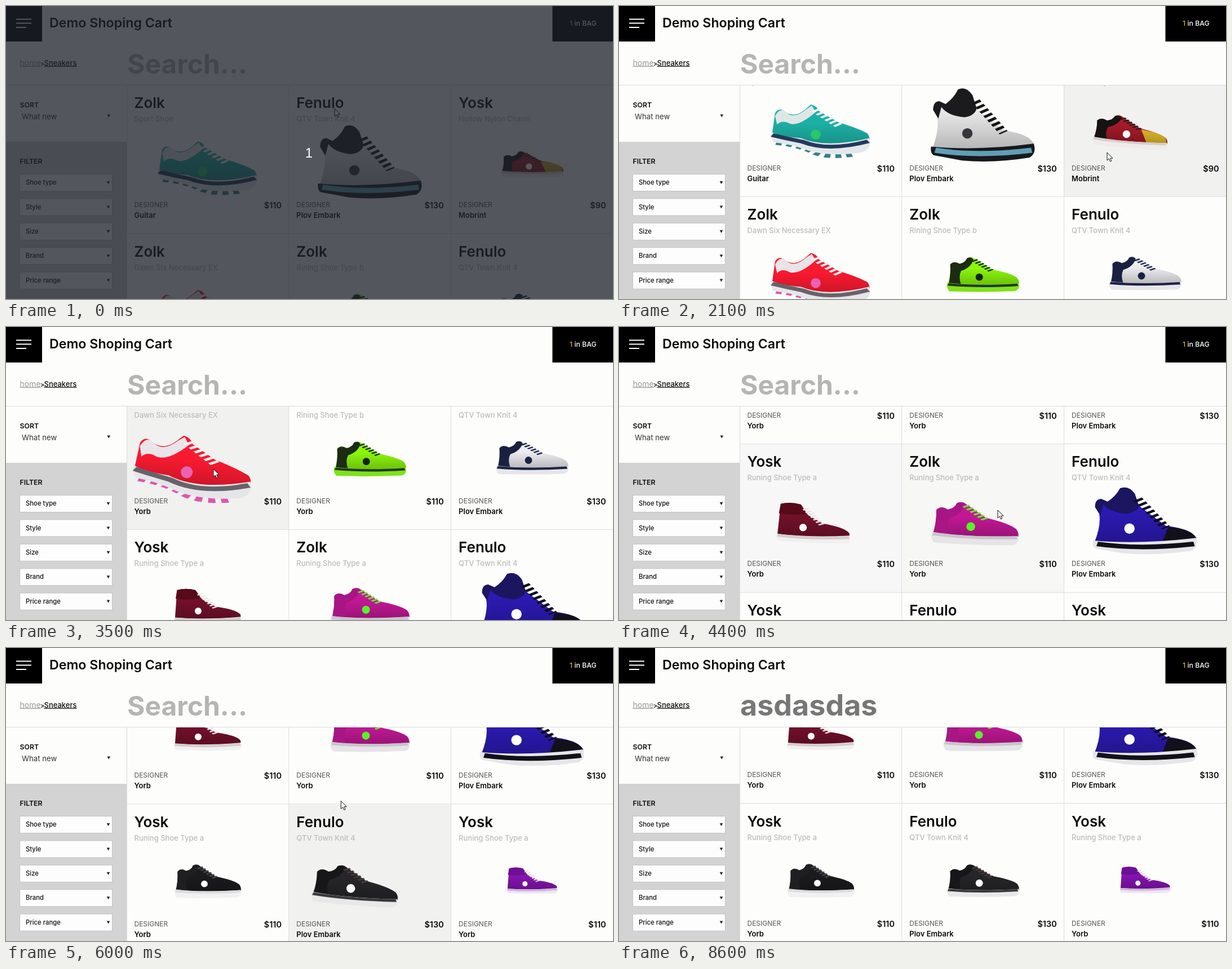
Recreate the animation shown at these times as an HTML page. Size 1077x520 px, loop 8700 ms.

```html
<!DOCTYPE html>
<html lang="en">
<head>
<meta charset="utf-8">
<title>Demo Shoping Cart</title>
<style>
  html, body { margin: 0; width: 100%; height: 100%; overflow: hidden; background: #fdfdfc; }
  svg { display: block; font-family: Inter, "Open Sans", sans-serif; }
</style>
</head>
<body>
<svg id="stage" width="1077" height="520" viewBox="0 0 1077 520"></svg>
<script>
const LOOP = 8700, TOP = 140, LEFT = 214, COL = 287.8, ROW = 263.7, HOVER_MS = 450;

const text = (x, y, size, weight, fill, content, extra = '') =>
  `<text x="${x}" y="${y}" font-size="${size}" font-weight="${weight}" fill="${fill}" ${extra}>${content}</text>`;
const rect = (x, y, w, h, fill, extra = '') =>
  `<rect x="${x}" y="${y}" width="${w}" height="${h}" fill="${fill}" ${extra}/>`;
const path = (d, fill, extra = '') => `<path d="${d}" fill="${fill}" ${extra}/>`;
const line = (d, color, width, extra = '') =>
  path(d, 'none', `stroke="${color}" stroke-width="${width}" ${extra}`);
const arrowDown = (x, y) => path(`M${x - 2.8} ${y - 2.5}h5.6l-2.8 5z`, '#222');

// Shoe outlines in a 100 x 100 box, heel on the left
const SHAPES = {
  sport: {
    upper: 'M1 56L4 16Q8 4 14 14Q24 26 34 10L40 0Q46 2 48 12L68 34Q86 44 97 55Q101 64 98 74L60 86L30 74Z',
    collar: 'M4 22Q9 3 16 16Q24 28 36 8L41 2L45 14Q26 46 16 34Q10 30 6 38Z',
    sole: 'M0 52Q10 62 30 64Q55 84 99 64Q102 84 92 91Q60 100 38 88Q20 75 3 72Q-1 64 0 52Z',
    band: 'M1 58Q16 65 32 71Q58 90 98 70',
    laces: 'M44 10L68 40', cleats: 'M5 73Q28 77 42 90T84 95',
    toe: 'M70 38Q87 45 97 55L98 70L78 76Z', mark: [45, 57]
  },
  low: {
    upper: 'M2 80Q6 50 5 22Q10 10 18 20Q26 16 28 4Q34-3 39 6L62 36Q88 46 97 60Q101 70 99 82Z',
    collar: 'M3 78Q6 48 5 22Q10 10 18 20Q26 16 28 4Q34-2 37 8Q33 32 20 40Q16 56 20 80Z',
    sole: 'M1 74Q40 84 99 76Q102 92 94 98Q50 102 4 99Q-1 88 1 74Z',
    band: 'M2 79Q45 87 98 80', laces: 'M38 9L63 42',
    toe: 'M64 40Q88 46 97 60L99 78L72 80Z', mark: [45, 58]
  },
  high: {
    upper: 'M1 84Q8 58 6 40L2 30Q2 18 8 18L14 22Q22 14 26 2Q34-3 40 10L44 28L70 58Q94 62 99 76V86Z',
    collar: 'M2 30Q2 18 8 18L14 22Q22 14 26 2Q34-3 40 10L44 28Q42 38 32 40Q16 38 10 26L7 42Z',
    sole: 'M0 80Q45 86 99 76Q102 89 95 95Q60 103 30 99L3 92Q-1 90 0 80Z',
    band: 'M4 85Q45 94 97 85', laces: 'M43 18L70 61',
    toe: 'M72 60Q94 62 99 76V82L66 84Z', mark: [35, 62]
  },
  skate: {
    upper: 'M2 84L5 4Q18-3 32 4L42 30L62 50Q92 58 98 72L99 86Z',
    collar: 'M3 28L5 4Q18-3 32 4L40 26Q20 34 3 28Z',
    sole: 'M1 80Q45 87 99 78Q102 92 95 98Q50 102 4 98Q-1 92 1 80Z',
    band: 'M2 84Q45 91 98 83', laces: 'M38 14L62 54',
    toe: 'M64 51Q92 58 98 72V82L66 84Z', mark: [36, 62]
  }
};

const shoe = (kind, w, h, cy, upper, collar, laces, sole, band, mark, toe = upper, cleats = '') =>
  ({ kind, w, h, cy, upper, collar, laces, sole, band, mark, toe, cleats });

const drawShoe = s => {
  const k = SHAPES[s.kind], [mx, my] = k.mark;
  return `<g transform="translate(${-s.w / 2} ${-s.h / 2})"><g transform="scale(${s.w / 100} ${s.h / 100})">` +
    (s.cleats && line(k.cleats, s.cleats, 8, 'stroke-dasharray="6 5"')) +
    path(k.upper, s.upper) + path(k.toe, s.toe) + path(k.upper, 'url(#shade)') +
    path(k.collar, s.collar) + path(k.sole, s.sole) + line(k.band, s.band, 7) +
    line(k.laces, s.laces, 9, 'stroke-dasharray="3.5 3.5"') +
    `</g><circle cx="${mx * s.w / 100}" cy="${my * s.h / 100}" r="${s.w * .05}" fill="${s.mark}"/></g>`;
};

const RUN = 'Runing Shoe Type a', KNIT = 'QTV Town Knit 4', HOUSE = 'Plov Embark';
const CARDS = [
  ['Zolk', 'Sport Shoe', 'Guitar', 110, shoe('sport', 176, 93, 147, '#1cb0a5', '#dfe6e6', '#f2f5f5', '#e3e8ea', '#24395c', '#27c76b', '#1cb0a5', '#3a7f86')],
  ['Fenulo', KNIT, HOUSE, 130, shoe('high', 184, 130, 136, '#e6e6e7', '#1b1b1d', '#161616', '#17191c', '#5f9fb6', '#35353a')],
  ['Yosk', 'Hollow Nylon Charm', 'Mobrint', 90, shoe('low', 112, 47, 141, '#a31a28', '#151313', '#2a1a1a', '#efebea', '#d5cccb', '#ffffff', '#e2b829')],
  ['Zolk', 'Dawn Six Necessary EX', 'Yorb', 110, shoe('sport', 176, 94, 147, '#fa1a30', '#e9e4e8', '#fbeff2', '#e6e5e7', '#66636a', '#ea62b4', '#fa1a30', '#dd56ad')],
  ['Zolk', 'Rining Shoe Type b', 'Yorb', 110, shoe('low', 129, 62, 138, '#8af50d', '#1c2b12', '#1c3510', '#7fe21a', '#223512', '#14220c')],
  ['Fenulo', KNIT, HOUSE, 130, shoe('low', 129, 60, 136, '#ececf0', '#1a2140', '#20294a', '#e6e6ea', '#1b2344', '#1a2140')],
  ['Yosk', RUN, 'Yorb', 110, shoe('skate', 121, 64, 137, '#72102a', '#560a1a', '#eee3e4', '#f1f0f0', '#d6cccd', '#ffffff')],
  ['Zolk', RUN, 'Yorb', 110, shoe('low', 141, 68, 137, '#c31896', '#a81585', '#68ee2e', '#e6e4e6', '#c9c4c9', '#5bf02a')],
  ['Fenulo', KNIT, HOUSE, 130, shoe('high', 185, 119, 136, '#2c1ab4', '#1c1560', '#0d0b1c', '#e6e6e9', '#101018', '#ffffff', '#141320')],
  ['Yosk', RUN, 'Yorb', 110, shoe('low', 119, 60, 137, '#1b1b1d', '#1f1f21', '#48484c', '#f1f1f1', '#dcdcdc', '#ffffff')],
  ['Fenulo', KNIT, HOUSE, 130, shoe('low', 129, 58, 137, '#262528', '#171719', '#46393a', '#e8e8e8', '#39393b', '#ffffff')],
  ['Yosk', RUN, 'Yorb', 110, shoe('skate', 91, 47, 136, '#8413b0', '#6f0e98', '#e9d9f0', '#efe6f2', '#cdb3d8', '#ffffff')]
];

const drawCard = ([brand, model, designer, price, item], i) => {
  const x = LEFT + i % 3 * COL, y = TOP + Math.floor(i / 3) * ROW;
  return `<g transform="translate(${x} ${y})">` +
    rect(0, 0, COL, ROW, '#f1f1f0', 'class="tint"') +
    line(`M0 ${ROW}H${COL}`, '#dcdce2', 1) +
    text(13.5, 41, 26, 600, '#0b0b0b', brand) +
    text(13.5, 65, 13, 500, '#bcbcbc', model) +
    text(13.5, 217, 12, 400, '#555', 'DESIGNER') +
    text(13.5, 236, 13, 600, '#0b0b0b', designer) +
    text(275, 219, 14.5, 600, '#0b0b0b', '$' + price, 'text-anchor="end"') +
    `<g class="shoe">${drawShoe(item)}</g></g>`;
};

const select = (label, i) => {
  const y = 298.5 + i * 43.4;
  return rect(24.5, y, 164, 30, '#fdfdfd', 'stroke="#c2c2c2"') +
    text(35, y + 18.6, 11.3, 500, '#111', label) + arrowDown(181.5, y + 15);
};

const stage = document.getElementById('stage');
stage.innerHTML =
  `<clipPath id="view">${rect(LEFT, TOP, 863, 380, '#000')}</clipPath>` +
  '<linearGradient id="shade" x2="0" y2="1"><stop offset=".4" stop-opacity="0"/>' +
  '<stop offset="1" stop-opacity=".22"/></linearGradient>' +
  rect(0, 0, 1077, 520, '#fdfdfc') +
  `<g clip-path="url(#view)"><g id="grid">${CARDS.map(drawCard).join('')}</g></g>` +
  line('M0 140.5H1077M214.5 140V520M501.8 140V520M789.6 140V520', '#dcdce2', 1) +
  rect(0, 0, 64, 63, '#000') +
  line('M18 23.5H45M18 30.5H45M18 38H36', '#fff', 2) +
  text(77, 38, 23.2, 600, '#0b0b0b', 'Demo Shoping Cart') +
  rect(969.5, 0, 107.5, 63, '#000') +
  text(1000, 34.7, 12.3, 500, '#fff', '<tspan fill="#d3b64c">1</tspan> in BAG') +
  text(24.5, 105.5, 14, 400, '#999', 'home', 'text-decoration="underline"') +
  text(61, 105.5, 11, 600, '#111', '&gt;') +
  text(67.5, 105.5, 13, 500, '#111', 'Sneakers', 'text-decoration="underline"') +
  text(215, 119.5, 48, 700, '#b5b5b5', '', 'id="search"') +
  text(24.5, 180, 12.3, 600, '#0b0b0b', 'SORT') +
  text(28, 200.5, 13.2, 400, '#333', 'What new') + arrowDown(182.3, 195) +
  rect(0, 241, 214, 279, '#d3d3d3') +
  text(24.5, 280, 12.3, 600, '#0b0b0b', 'FILTER') +
  ['Shoe type', 'Style', 'Size', 'Brand', 'Price range'].map(select).join('') +
  '<g id="pointer">' +
  path('M0 0V14L3.3 11L5.6 16L7.8 15L5.6 10.2H10Z', '#fff', 'id="arrow" stroke="#111"') +
  line('M-2.5-6H-.8L0-5L.8-6H2.5M0-5V5M-2.5 6H-.8L0 5L.8 6H2.5', '#111', 1.4, 'id="beam"') +
  '</g><g id="countdown">' + rect(0, 0, 1077, 520, 'rgb(30,33,41)', 'opacity=".757"') +
  text(537.5, 269, 24, 400, '#fff', '1', 'text-anchor="middle" font-family="Liberation Sans, sans-serif"') +
  '</g>';

const get = id => document.getElementById(id);
const grid = get('grid'), search = get('search'), pointer = get('pointer');
const arrow = get('arrow'), beam = get('beam'), countdown = get('countdown');
const tints = document.querySelectorAll('.tint'), shoes = document.querySelectorAll('.shoe');

// Keys: time, then values
const SCROLL = [[1700, 0], [2050, 65.5], [2400, 65.5], [3000, 308], [3550, 308], [3900, 460],
  [4500, 460], [5000, 643.5], [5800, 643.5], [6050, 655.5]];
const POINTER = [[0, 583, 182], [900, 583, 200], [1600, 866, 260], [2300, 866, 260], [2900, 368, 252],
  [3900, 368, 252], [4400, 672, 325], [4700, 700, 340], [5100, 850, 430], [5400, 774, 435],
  [5800, 650, 330], [6400, 437, 106]];
// Card, hover start, hover end
const HOVERS = [[1, 0, 1400], [2, 1400, 2440], [4, 2440, 2710], [3, 2710, 3770], [6, 3770, 4170],
  [7, 4170, 4750], [10, 4750, 4940], [11, 4940, 5340], [10, 5340, 5980], [7, 5980, 6130], [6, 6130, 6250]];

const clamp = v => Math.min(1, Math.max(0, v));
const ease = v => v * v * (3 - 2 * v);

function sample(keys, t) {
  const next = keys.findIndex(k => k[0] > t);
  if (next < 0) return keys.at(-1).slice(1);
  if (next === 0) return keys[0].slice(1);
  const a = keys[next - 1], b = keys[next], p = ease((t - a[0]) / (b[0] - a[0]));
  return a.slice(1).map((v, i) => v + (b[i + 1] - v) * p);
}

function draw(t) {
  grid.setAttribute('transform', `translate(0 ${-sample(SCROLL, t)[0]})`);

  const hover = CARDS.map(() => 0);
  for (const [card, start, end] of HOVERS)
    hover[card] += clamp((t - start) / HOVER_MS) - clamp((t - end) / HOVER_MS);
  hover.forEach((h, i) => {
    const p = ease(clamp(h));
    tints[i].setAttribute('opacity', p);
    shoes[i].setAttribute('transform',
      `translate(${COL / 2 - 26 * p} ${CARDS[i][4].cy + 8 * p}) rotate(${4.5 * p}) scale(${1 + .2 * p})`);
  });

  const [x, y] = sample(POINTER, t), overSearch = y < TOP;
  pointer.setAttribute('transform', `translate(${x} ${y})`);
  pointer.setAttribute('visibility', t < 7500 ? 'visible' : 'hidden');
  arrow.setAttribute('display', overSearch ? 'none' : 'inline');
  beam.setAttribute('display', overSearch ? 'inline' : 'none');

  const typed = t < 7500 ? 0 : t >= 8600 ? 8 : Math.min(7, 1 + Math.floor((t - 7500) / 120));
  search.textContent = typed ? 'asdasdas'.slice(0, typed) : 'Search...';
  search.setAttribute('fill', typed ? '#777' : '#b5b5b5');
  search.setAttribute('font-size', typed ? 52 : 48);

  countdown.setAttribute('display', t < 100 ? 'inline' : 'none');
}

const began = performance.now();
function tick() {
  draw((performance.now() - began) % LOOP);
  requestAnimationFrame(tick);
}
tick();
</script>
</body>
</html>
```
